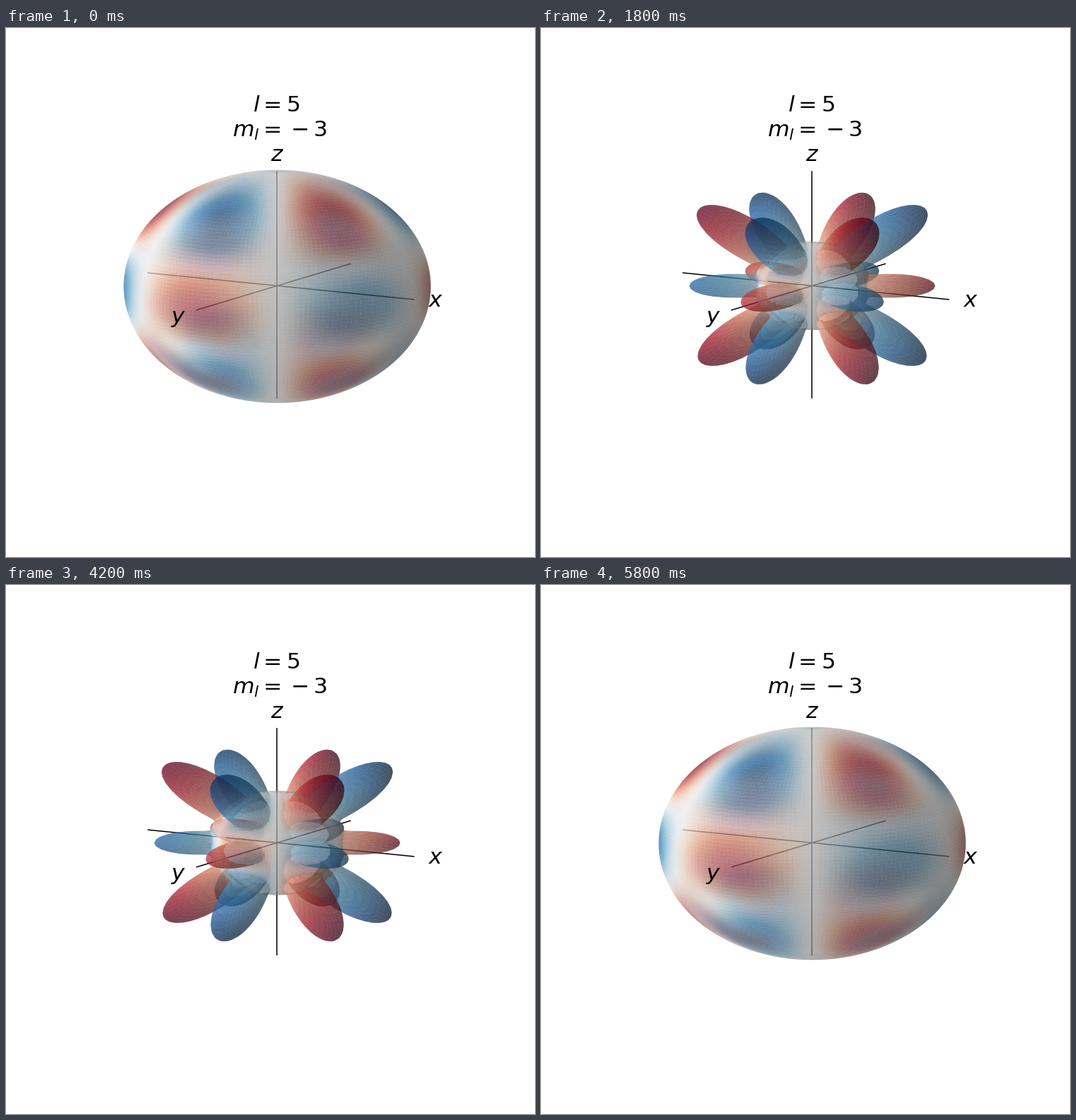
A matplotlib script for the animation above (5.9 s loop, 748 by 748 pixels).

```python
import numpy as np
import matplotlib.pyplot as plt
from matplotlib.animation import FuncAnimation
from matplotlib.collections import PolyCollection

SIZE, DPI = 748, 110
CENTER = np.array([383.5, 364.5])
SCALE, DIST = 216.7, 17.5          # pixels per unit, camera distance
ELEV, AZIM = np.radians([10, 30])
ALPHA = 0.5
HALF = 29                          # steps from full sphere to bare harmonic
N_THETA, N_PHI = 100, 200

VIEW = np.array([np.cos(ELEV) * np.cos(AZIM), np.cos(ELEV) * np.sin(AZIM), np.sin(ELEV)])
RIGHT = np.array([-np.sin(AZIM), np.cos(AZIM), 0])
UP = np.cross(VIEW, RIGHT)
LIGHT = np.array([2, -2, 1]) / 3


def project(p):
    """Perspective view of points in the 4:4:3 box; returns pixels and depth."""
    q = p * [1, 1, 0.75]
    depth = q @ VIEW
    zoom = SCALE * DIST / (DIST - depth)
    xy = np.stack([q @ RIGHT * zoom, -(q @ UP) * zoom], axis=-1)
    return xy + CENTER, depth


def corners(a):
    """The four corners of every grid cell, one cell per row."""
    cells = np.stack([a[:-1, :-1], a[1:, :-1], a[1:, 1:], a[:-1, 1:]], axis=2)
    return cells.reshape(-1, *cells.shape[2:])


theta, phi = np.meshgrid(np.linspace(0, np.pi, N_THETA + 1),
                         np.linspace(0, 2 * np.pi, N_PHI + 1), indexing="ij")
direction = np.stack([np.sin(theta) * np.sin(phi),
                      np.sin(theta) * np.cos(phi),
                      np.cos(theta)], axis=-1)

# real harmonic l = 5, m = -3, scaled to a peak of 1
peak = (8 / 15) ** 1.5 * 3.2
Y = np.sin(theta) ** 3 * (9 * np.cos(theta) ** 2 - 1) * np.sin(3 * phi) / peak
base = plt.get_cmap("RdBu_r")((corners(Y).mean(axis=1) + 1) / 2)
outward = corners(direction).mean(axis=1)


def surface(r0):
    r = np.maximum(np.abs(Y), r0)
    quads = corners(r[..., None] * direction)
    normal = np.cross(quads[:, 2] - quads[:, 0], quads[:, 3] - quads[:, 1])
    normal /= np.linalg.norm(normal, axis=1, keepdims=True) + 1e-15
    normal *= np.sign(np.sum(normal * outward, axis=1, keepdims=True))
    colors = base * (0.65 + 0.35 * normal @ LIGHT)[:, None]
    colors[:, 3] = ALPHA
    xy, depth = project(quads)
    order = np.argsort(depth.mean(axis=1))
    return xy[order], np.clip(colors[order], 0, 1)


fig = plt.figure(figsize=(SIZE / DPI, SIZE / DPI), dpi=DPI, facecolor="white")
ax = fig.add_axes([0, 0, 1, 1])
ax.set(xlim=(0, SIZE), ylim=(SIZE, 0))
ax.axis("off")

for axis in np.eye(3):
    ends, _ = project(np.array([-axis, axis]))
    ax.plot(*ends.T, color="black", lw=1, zorder=1)

shape = PolyCollection([], linewidths=0, edgecolors="none", zorder=2)
ax.add_collection(shape, autolim=False)

for x, y, label, ha in [(382.3, 117.6, "$l=5$", "center"),
                        (320.3, 154.3, "$m_l{=}-3$", "left"),
                        (383.2, 187.6, "$z$", "center"),
                        (608, 394.3, "$x$", "center"),
                        (243.5, 417.3, "$y$", "center")]:
    ax.text(x, y, label, size=20.5, ha=ha, va="baseline", zorder=3)


def update(i):
    verts, colors = surface(abs(HALF - i) / HALF)
    shape.set_verts(verts)
    shape.set_facecolor(colors)
    return [shape]


anim = FuncAnimation(fig, update, frames=2 * HALF + 1, interval=100, repeat=True)
plt.show()
```
